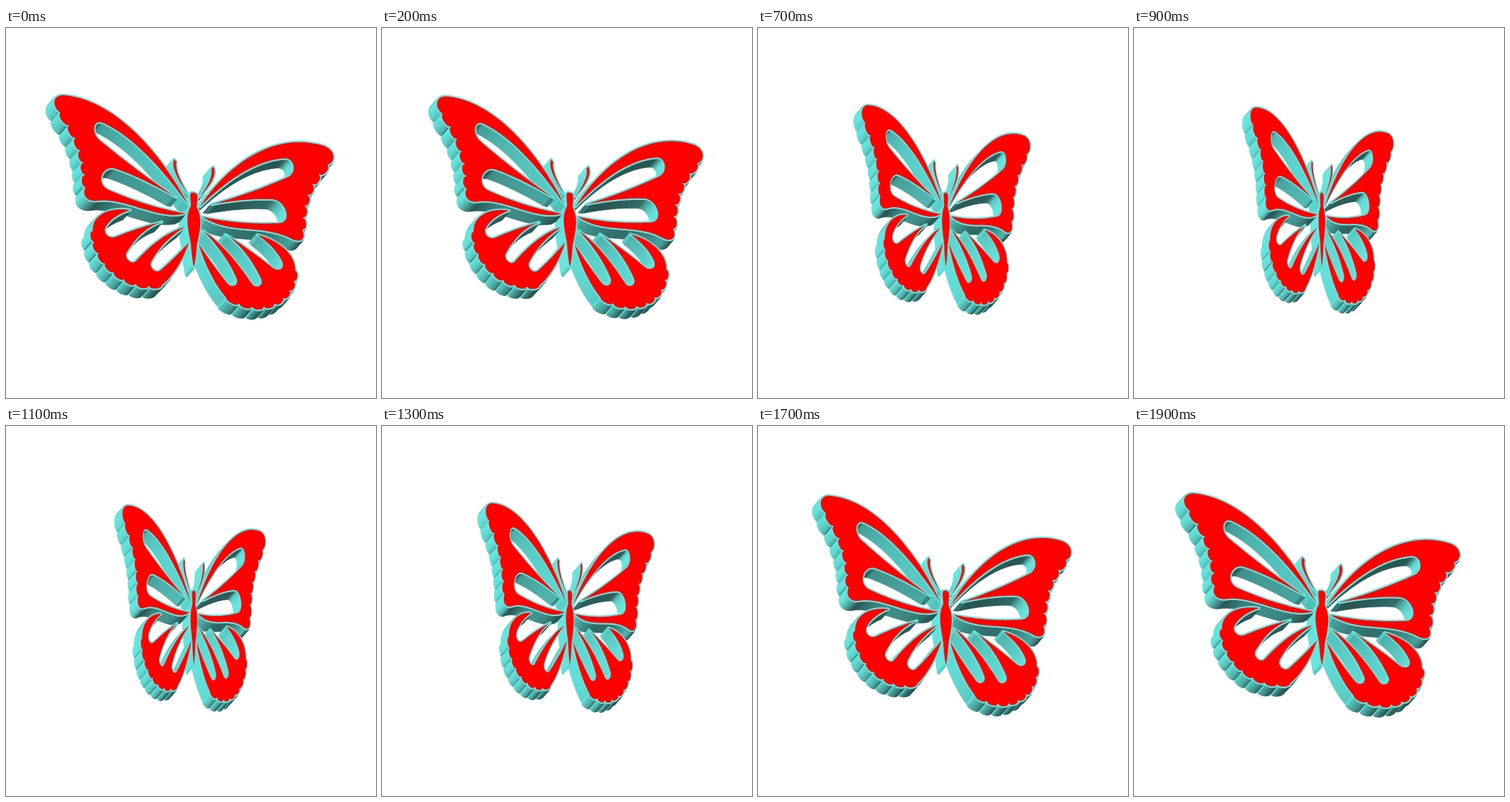
An HTML page with a canvas for the animation above (2 s loop, 512 by 512 pixels).

```html
<!DOCTYPE html>
<html lang="en">
<head>
<meta charset="utf-8">
<title>Butterfly</title>
<style>
  html, body { margin: 0; width: 100%; height: 100%; overflow: hidden; background: #fff; }
  canvas { display: block; }
</style>
</head>
<body>
<canvas id="stage" width="512" height="512"></canvas>
<script>
const ctx = document.getElementById('stage').getContext('2d');
const CENTER = 260, SKEW = 0.195, RIM = 2;
const DEPTH = [-10, 11.5];              // extrusion as seen on screen
const TEAL = [98, 230, 222], RED = '#f00';
const STEP = 100, STEPS = 20;

const mix = (a, b, t) => [a[0] + (b[0] - a[0]) * t, a[1] + (b[1] - a[1]) * t];

// Point on a Bezier curve of any degree
function pointAt(points, t) {
  while (points.length > 1) points = points.slice(1).map((p, i) => mix(points[i], p, t));
  return points[0];
}

// Samples of a curve, leaving the end point to the next piece
const bezier = (...points) => Array.from({ length: 24 }, (_, i) => pointAt(points, i / 24));

// Round bumps sitting on a curve
function scallops(count, bulge, ...points) {
  const out = [];
  for (let i = 0; i < count; i++) {
    const a = pointAt(points, i / count), b = pointAt(points, (i + 1) / count);
    const dx = b[0] - a[0], dy = b[1] - a[1], len = Math.hypot(dx, dy);
    for (let t = 0; t < 0.99; t += 1 / 8) {
      const h = Math.sqrt(t * (1 - t)) * 2 * bulge / len;
      out.push([a[0] + dx * t + dy * h, a[1] + dy * t - dx * h]);
    }
  }
  return out;
}

// Cut-out running from one strip tip around a rounded head to the next tip
function finger(from, bendOut, headA, headB, bendBack, to) {
  const width = Math.hypot(headA[0] - headB[0], headA[1] - headB[1]);
  const beyond = (bend, head) =>
    mix(bend, head, 1 + 0.6 * width / Math.hypot(head[0] - bend[0], head[1] - bend[1]));
  return [
    ...bezier(from, bendOut, headA),
    ...bezier(headA, beyond(bendOut, headA), beyond(bendBack, headB), headB),
    ...bezier(headB, bendBack, to)
  ];
}

const mirror = shape => shape.map(([x, y]) => [-x, y]).reverse();

const forewing = [
  ...bezier([8, 246], [45, 182], [110, 120], [180, 128]),
  ...bezier([180, 128], [197, 131], [196, 148], [185, 153]),
  ...scallops(6, 5, [185, 153], [158, 184], [149, 215], [150, 250]),
  ...bezier([150, 250], [156, 263], [146, 269], [135, 265.5]),
  ...bezier([135, 265.5], [95, 252], [50, 277], [12, 259]),
  ...finger([12, 259], [65, 260], [118, 247], [108, 216], [73, 221], [24, 239.5]),
  ...finger([24, 239.5], [78, 214], [130, 181], [125, 156], [72, 170], [8, 246])
];

const hindwing = [
  ...bezier([88, 269], [115, 270], [141, 285], [140, 308]),
  ...scallops(8, 4.2, [140, 308], [140, 350], [95, 385], [44, 364]),
  ...bezier([44, 364], [29, 350], [14, 322], [7, 298]),
  ...finger([7, 298], [26, 323], [46, 344], [59, 335], [45, 305], [13, 278]),
  ...finger([13, 278], [46, 294], [80, 338], [93, 329], [73, 291], [44, 277]),
  ...finger([44, 277], [75, 290], [108, 310], [122, 299], [113, 282], [88, 269])
];

const antenna = [
  ...bezier([27, 187], [34, 200], [8, 232]),
  ...bezier([8, 232], [28, 202], [24, 189])
];

const bodySide = [
  ...bezier([0, 228], [8, 227], [4, 238], [4, 247]),
  ...bezier([4, 247], [12, 262], [9, 276], [4, 300]),
  ...bezier([4, 300], [3, 318], [0, 331])
];

const shapes = [[...bodySide, [0, 331], ...mirror(bodySide)]];
for (const part of [forewing, hindwing, antenna]) shapes.push(part, mirror(part));

// Contour pushed outward to the edge of the rim
function outset(shape) {
  const n = shape.length;
  return shape.map(([x, y], i) => {
    const p = shape[(i + n - 1) % n], q = shape[(i + 1) % n];
    const a = Math.hypot(x - p[0], y - p[1]) || 1, b = Math.hypot(q[0] - x, q[1] - y) || 1;
    const tx = (x - p[0]) / a + (q[0] - x) / b, ty = (y - p[1]) / a + (q[1] - y) / b;
    const len = Math.hypot(tx, ty) || 1;
    return [x + ty / len * RIM, y - tx / len * RIM];
  });
}

function tracePath(shape) {
  const path = new Path2D();
  shape.forEach(([x, y]) => path.lineTo(x, y));
  path.closePath();
  return path;
}

const paths = shapes.map(tracePath);
const edges = shapes.map(outset);
const shade = level => `rgb(${TEAL.map(c => Math.round(c * Math.min(1, level)))})`;

// Walls turned to the left catch the light, those turned down stay dark
const wallColor = nx => shade(Math.max(0.36, 0.43 - 0.56 * nx));

function wallsAt(scale) {
  const walls = [];
  for (const edge of edges) {
    const pts = edge.map(([x, y]) => [CENTER + x * scale, y + SKEW * x * scale]);
    pts.forEach((a, i) => {
      const b = pts[(i + 1) % pts.length];
      const dx = b[0] - a[0], dy = b[1] - a[1], len = Math.hypot(dx, dy);
      if (len < 1e-6 || dy * DEPTH[0] - dx * DEPTH[1] <= 0) return;
      const order = (a[0] + b[0]) * DEPTH[0] + (a[1] + b[1]) * DEPTH[1];
      walls.push({ a, b, order, color: wallColor(dy / len) });
    });
  }
  return walls.sort((p, q) => p.order - q.order);
}

function draw(scale) {
  ctx.setTransform(1, 0, 0, 1, 0, 0);
  ctx.fillStyle = '#fff';
  ctx.fillRect(0, 0, 512, 512);
  ctx.lineJoin = 'round';
  ctx.lineWidth = 0.5;
  const [ex, ey] = DEPTH;
  for (const { a, b, color } of wallsAt(scale)) {
    ctx.fillStyle = ctx.strokeStyle = color;
    ctx.beginPath();
    ctx.moveTo(a[0], a[1]);
    ctx.lineTo(b[0], b[1]);
    ctx.lineTo(b[0] + ex, b[1] + ey);
    ctx.lineTo(a[0] + ex, a[1] + ey);
    ctx.closePath();
    ctx.fill();
    ctx.stroke();
  }
  ctx.setTransform(scale, SKEW * scale, 0, 1, CENTER, 0);
  ctx.lineWidth = 2 * RIM;
  ctx.strokeStyle = shade(1);
  paths.forEach(path => ctx.stroke(path));
  ctx.fillStyle = RED;
  paths.forEach(path => ctx.fill(path));
}

let shown = -1;
function tick() {
  const step = Math.floor(performance.now() / STEP) % STEPS;
  if (step !== shown) {
    shown = step;
    draw(0.75 + 0.25 * Math.cos(2 * Math.PI * step / STEPS));
  }
  requestAnimationFrame(tick);
}
tick();
</script>
</body>
</html>
```
